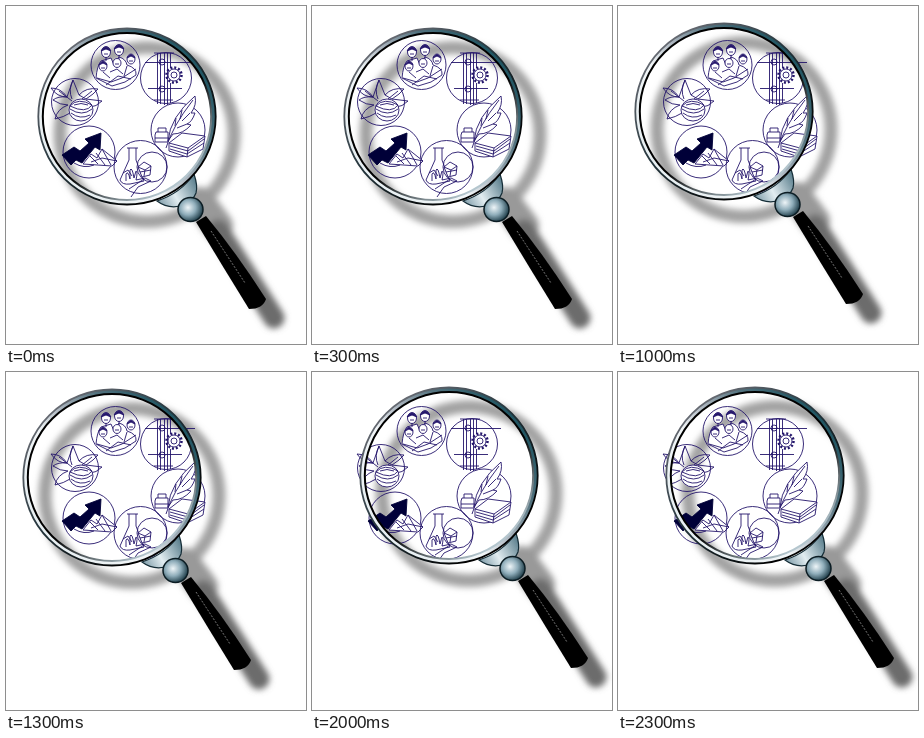
An HTML page that plays this animation: 300x338 px, repeating every 2500 ms.

```html
<!DOCTYPE html>
<html lang="en">
<head>
<meta charset="utf-8">
<title>Magnifier</title>
<style>
  html, body { margin: 0; width: 100%; height: 100%; overflow: hidden; background: #fff; }
  svg { display: block; width: 300px; height: 338px; }
  .icons { fill: none; stroke: #24166b; stroke-width: .9; stroke-linejoin: round; }
  .solid { fill: #000038; stroke: #000038; }
  .dark { fill: #24166b; }
  .paper { fill: #fff; }
</style>
</head>
<body>
<svg viewBox="0 0 300 338">
  <defs>
    <linearGradient id="rim" gradientUnits="userSpaceOnUse" x1="200" y1="65" x2="60" y2="185">
      <stop offset="0" stop-color="#1d5360"/>
      <stop offset=".25" stop-color="#53727e"/>
      <stop offset=".45" stop-color="#a9b3bd"/>
      <stop offset=".62" stop-color="#f2f6f8"/>
      <stop offset="1" stop-color="#e6eef1"/>
    </linearGradient>
    <linearGradient id="outer" gradientUnits="userSpaceOnUse" x1="55" y1="50" x2="165" y2="175">
      <stop offset="0" stop-color="#666a72"/>
      <stop offset=".5" stop-color="#22333a"/>
      <stop offset="1" stop-color="#000"/>
    </linearGradient>
    <linearGradient id="inner" gradientUnits="userSpaceOnUse" x1="75" y1="60" x2="165" y2="180">
      <stop offset="0" stop-color="#000"/>
      <stop offset=".55" stop-color="#000"/>
      <stop offset="1" stop-color="#b4c6ce"/>
    </linearGradient>
    <linearGradient id="collar" gradientUnits="userSpaceOnUse" x1="155" y1="198" x2="191" y2="178">
      <stop offset="0" stop-color="#8aa5b1"/>
      <stop offset=".4" stop-color="#e2edf1"/>
      <stop offset="1" stop-color="#5f8290"/>
    </linearGradient>
    <radialGradient id="ball" cx=".4" cy=".42" r=".62">
      <stop offset="0" stop-color="#eef5f8"/>
      <stop offset=".5" stop-color="#8fadba"/>
      <stop offset="1" stop-color="#1c3a46"/>
    </radialGradient>
    <filter id="soft" filterUnits="userSpaceOnUse" x="0" y="0" width="340" height="380">
      <feGaussianBlur stdDeviation="3.2"/>
    </filter>
    <g id="shadow" fill="none" stroke-linecap="round" filter="url(#soft)">
      <circle cx="141" cy="128.500" r="87" stroke="#a2a2a2" stroke-width="13"/>
      <path d="M194 196 212 220" stroke="#999" stroke-width="30"/>
      <path d="M212 224 268 312" stroke="#6c6c6c" stroke-width="21"/>
    </g>
    <g id="glass" fill="none">
      <path d="M151 195Q175 187 188 168Q192 180 190 187Q187 195 178 199Q163 204 151 195Z"
            fill="url(#collar)" stroke="#142c36" stroke-width="1.2"/>
      <ellipse cx="121" cy="110.500" rx="86.700" ry="86" stroke="url(#rim)" stroke-width="4.500"/>
      <ellipse cx="121" cy="110.500" rx="88.700" ry="88" stroke="url(#outer)" stroke-width="1.800"/>
      <ellipse cx="121" cy="110.500" rx="84.200" ry="83.500" stroke="url(#inner)" stroke-width="2"/>
      <path d="M190 216 200 210Q230 246 260 293Q257 303 243 303Q217 261 190 216Z" fill="#000"/>
      <path d="M205 225 239 277" stroke="#777" stroke-dasharray="2 1.5"/>
      <ellipse cx="184.500" cy="203.500" rx="12.500" ry="12" fill="url(#ball)" stroke="#0b1c23" stroke-width="1.500"/>
    </g>
  </defs>

  <use class="lens" href="#shadow"/>

  <g class="icons">
    <!-- people -->
    <circle cx="109.500" cy="59" r="24.500"/>
    <g class="paper">
      <path d="M90 72Q91 60 95 55L105 52 108 59 113 51Q120 53 121 59Q131 62 130 69L119 76 106 80Z"/>
      <ellipse cx="100" cy="46" rx="4.500" ry="5.500"/>
      <ellipse cx="113" cy="44" rx="4.500" ry="5.500"/>
      <ellipse cx="125" cy="53" rx="4" ry="5"/>
      <ellipse cx="97" cy="60" rx="4" ry="5"/>
      <ellipse cx="111" cy="57" rx="4" ry="4.500"/>
    </g>
    <path class="dark" d="M95 45Q100 37 105 45L100 43ZM108 43Q113 35 118 43L113 41ZM121 52Q125 45 129 52L125 50ZM93 59Q97 52 101 59L97 57Z"/>
    <path d="M98 48h4M111 46h4M123 55h4M95 62h4M109 58h4M100 51v4M113 49v4M104 66 111 63 117 68M91 72 105 76 116 72 130 63M100 79 112 70 125 73M97 66 104 72M121 60 118 70"/>

    <!-- blossom -->
    <circle cx="69" cy="96" r="23.500"/>
    <path d="M45 82Q55 82 61 91L67 74 73 89Q80 81 92 83Q88 88 80 93L96 95Q90 101 84 101M61 91Q52 90 47 94 54 99 62 99Q51 103 49 113Q58 111 64 107M45 82Q51 91 61 91M67 74Q62 84 66 93M73 89 80 93M53 85 66 95M86 85 76 93"/>
    <ellipse class="paper" cx="75" cy="104" rx="12" ry="11"/>
    <path d="M64 100Q72 91 86 99Q80 108 64 100M65 107Q74 114 84 109M68 99Q75 96 82 99M64 103Q76 111 86 103"/>

    <!-- rising arrow -->
    <circle cx="83" cy="146" r="26"/>
    <path class="paper" d="M77 158 85 148 91 152 96 143 111 155 106 160Z"/>
    <path d="M84 150 92 158M90 147 99 159M96 143 105 159M85 156 96 152 111 155M68 157Q78 163 88 159"/>
    <path class="solid" d="M56 149 68 141 74 145 83 137 79 133 95 127 94 144 89 141 76 157 70 154 65 159Z"/>

    <!-- flask -->
    <circle cx="134.500" cy="161" r="26.500"/>
    <circle cx="146" cy="161" r="15"/>
    <path d="M121 142h11M123 142v12L114 174Q116 179 124 178L138 175 130 154V142M117 167 122 164 126 170"/>
    <path class="paper" d="M132 161 138 156 145 160 144 169 136 171Z"/>
    <path d="M132 161 139 164 145 160M139 164 138 170M134 166 145 164M120 175V168Q122 164 124 173V164Q126 160 128 172L130 165Q132 165 130 174L139 172 145 175 132 181 125 191M123 183 138 173"/>

    <!-- quill and book -->
    <circle cx="172" cy="124" r="27"/>
    <path class="paper" d="M163 137 176 127 199 130 197 143 181 151 163 145Z"/>
    <path d="M163 137 182 142 199 130M182 142 181 151M164 140 182 145 198 133M164 143 181 148 198 137"/>
    <path d="M150 126h12V136H149V129ZM152 126v-4h8v4M149 132h14"/>
    <path class="paper" d="M162 135Q164 111 189 90Q191 99 185 107L189 107Q186 116 181 118L185 119Q177 128 167 128Z"/>
    <path d="M160 142Q166 121 187 94M169 120 170 112M174 113 176 104M176 115 184 107M171 122 181 118"/>

    <!-- columns and gear -->
    <circle cx="160" cy="72" r="25.500"/>
    <path d="M151.500 47V98M154.500 47V98M158.500 47V99M161.500 47V99M164.500 47V62M164.500 77V97M139 56.500H189M142 82.500H176M148 47H168M148 94H167"/>
    <circle class="paper" cx="168" cy="69" r="6"/>
    <circle cx="168" cy="69" r="7.500" stroke-width="2.500" stroke-dasharray="2 1.930"/>
    <circle cx="168" cy="69" r="3"/>
    <circle cx="156" cy="56" r="3"/>
    <circle cx="156" cy="83" r="3"/>
  </g>

  <use class="lens" href="#glass"/>
</svg>
<script>
  const HOLD = 500;
  const stops = [[0, 0], [-6, 10], [-15, -5], [4, -14], [16, -7]];
  const parts = document.querySelectorAll('.lens');

  // The lens jumps from stop to stop without easing.
  function draw() {
    const step = Math.floor(performance.now() / HOLD) % stops.length;
    for (const part of parts) part.setAttribute('transform', `translate(${stops[step]})`);
    requestAnimationFrame(draw);
  }
  draw();
</script>
</body>
</html>
```
